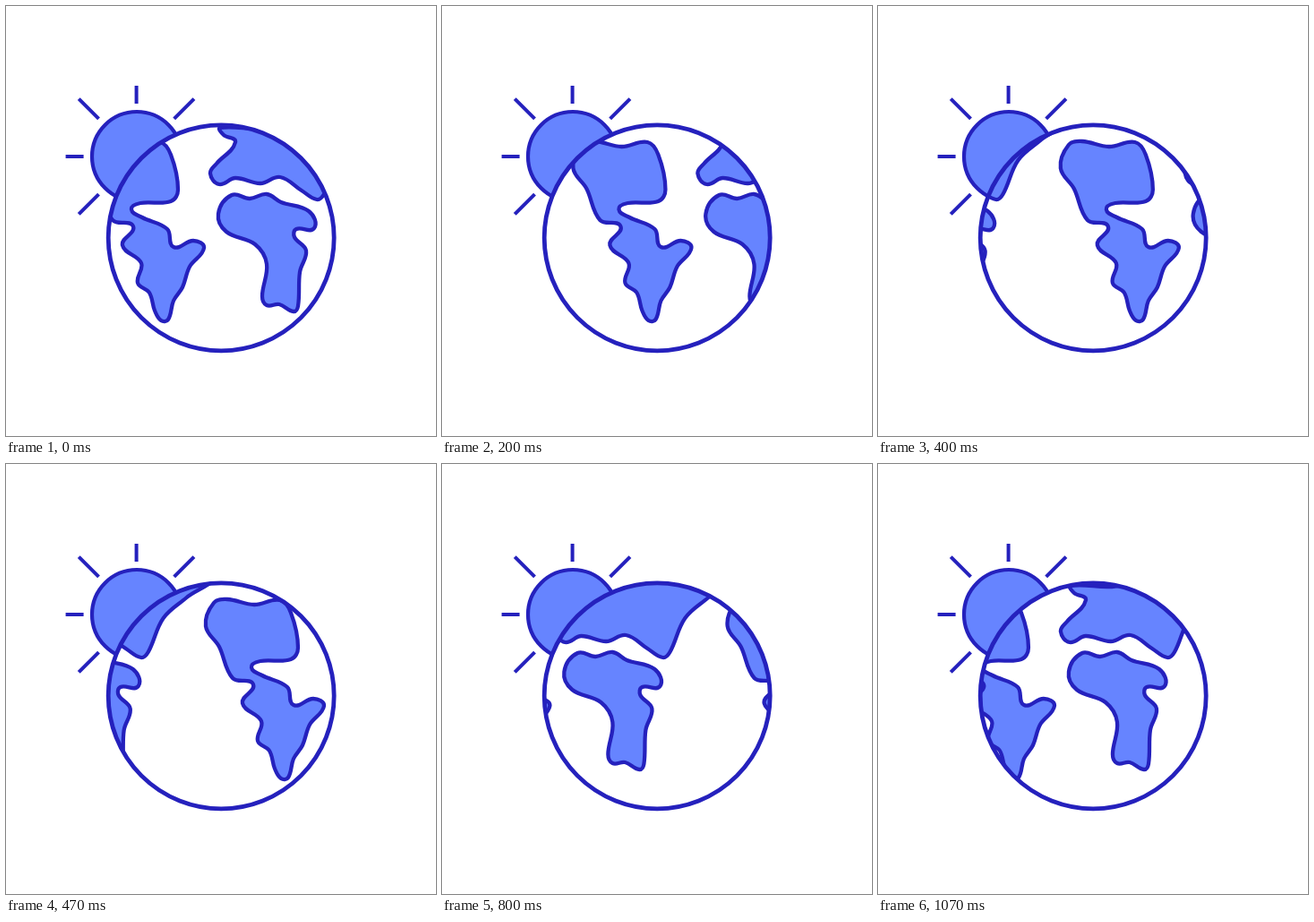
These frames come from a looping animation (480x480 px, 1130 ms). An HTML page with a canvas:

```html
<!DOCTYPE html>
<html lang="en">
<head>
<meta charset="utf-8">
<title>Turning globe</title>
<style>
html, body { margin: 0; width: 100%; height: 100%; overflow: hidden; background: #fff; }
canvas { display: block; width: 480px; height: 480px; }
</style>
</head>
<body>
<canvas id="stage" width="480" height="480"></canvas>
<script>
const ctx = document.getElementById('stage').getContext('2d');
const LINE = '#2521bd';
const FILL = '#6684ff';
const LOOP = 1130;
const STEP = 19.14;    // map shift per picture, px
const PERIOD = 330.3;  // width of the repeating map, px
const GLOBE = { x: 240.2, y: 258.8, r: 126 };
const SUN = { x: 146, y: 168, r: 50 };

// Key points of each coast; smooth() rounds them into a curve.
const americas = [
  [89, 181], [98, 155], [113, 151], [143, 157], [172, 152], [184, 166], [192, 205],
  [184, 218], [150, 220], [140, 227], [152, 236], [180, 249], [187, 269], [209, 262],
  [221, 270], [205, 291], [197, 314], [187, 329], [181, 350], [173, 351], [166, 340],
  [160, 320], [147, 309], [151, 287], [130, 267], [142, 246], [119, 239], [104, 204]
];
const africa = [
  [237, 232], [252, 211], [272, 215], [291, 210], [307, 219], [338, 229], [344, 248],
  [324, 249], [322, 258], [335, 273], [328, 297], [326, 335], [321, 341], [305, 333],
  [291, 334], [286, 324], [291, 288], [278, 266], [246, 252]
];
const eurasia = [
  [239, 136], [243, 144], [256, 152], [235, 176], [228, 187], [238, 199], [256, 192],
  [284, 198], [306, 191], [330, 206], [347, 216], [355, 210], [372, 172], [398, 149],
  [425, 126], [340, 128], [285, 137]
];

// Closed curve: tangents run parallel to the neighbours, handles scale with each span.
function smooth(points) {
  const n = points.length;
  const at = i => points[(i + n) % n];
  const dist = (p, q) => Math.hypot(q[0] - p[0], q[1] - p[1]);
  const handle = (i, h) => {
    const p = at(i), a = at(i - 1), b = at(i + 1), k = h / dist(a, b);
    return [p[0] + (b[0] - a[0]) * k, p[1] + (b[1] - a[1]) * k];
  };
  const path = new Path2D();
  path.moveTo(...at(0));
  for (let i = 0; i < n; i++) {
    const h = 0.36 * dist(at(i), at(i + 1));
    path.bezierCurveTo(...handle(i, h), ...handle(i + 1, -h), ...at(i + 1));
  }
  path.closePath();
  return path;
}

function disc({ x, y, r }, grow = 0) {
  const path = new Path2D();
  path.arc(x, y, r + grow, 0, Math.PI * 2);
  return path;
}

// Five rays, an eighth of a turn apart, from lower left round to upper right.
function makeRays() {
  const path = new Path2D();
  for (let i = 0; i < 5; i++) {
    const a = Math.PI * (3 + i) / 4;
    const [near, far] = i % 2 ? [59, 79] : [59.5, 91];
    for (const [r, move] of [[near, 'moveTo'], [far, 'lineTo']]) {
      path[move](SUN.x - 0.4 + r * Math.cos(a), SUN.y + r * Math.sin(a));
    }
  }
  return path;
}

const lands = [americas, africa, eurasia].map(smooth);
const globe = disc(GLOBE);
const globeClip = disc(GLOBE, 1.5);
const sun = disc(SUN);
const rays = makeRays();

function paint(path, fill, width) {
  if (fill) {
    ctx.fillStyle = fill;
    ctx.fill(path);
  }
  ctx.lineWidth = width;
  ctx.stroke(path);
}

// Fifteen pictures a second, change times rounded to 10 ms.
function pictureAt(t) {
  let n = 16;
  while (n > 0 && 10 * Math.round(n * 20 / 3) > t) n--;
  return n;
}

function draw(t) {
  const shift = pictureAt(t) * STEP;
  ctx.fillStyle = '#fff';
  ctx.fillRect(0, 0, 480, 480);
  ctx.strokeStyle = LINE;
  ctx.lineJoin = 'round';

  paint(sun, FILL, 4.2);
  paint(rays, null, 4);

  ctx.save();
  ctx.fillStyle = '#fff';
  ctx.fill(globe);
  ctx.clip(globeClip);
  for (const dx of [shift - PERIOD, shift]) {
    ctx.save();
    ctx.translate(dx, 0);
    lands.forEach(land => paint(land, FILL, 4.3));
    ctx.restore();
  }
  ctx.restore();

  paint(globe, null, 4.8);
}

const start = performance.now();
function tick() {
  draw((performance.now() - start) % LOOP);
  requestAnimationFrame(tick);
}
tick();
</script>
</body>
</html>
```
